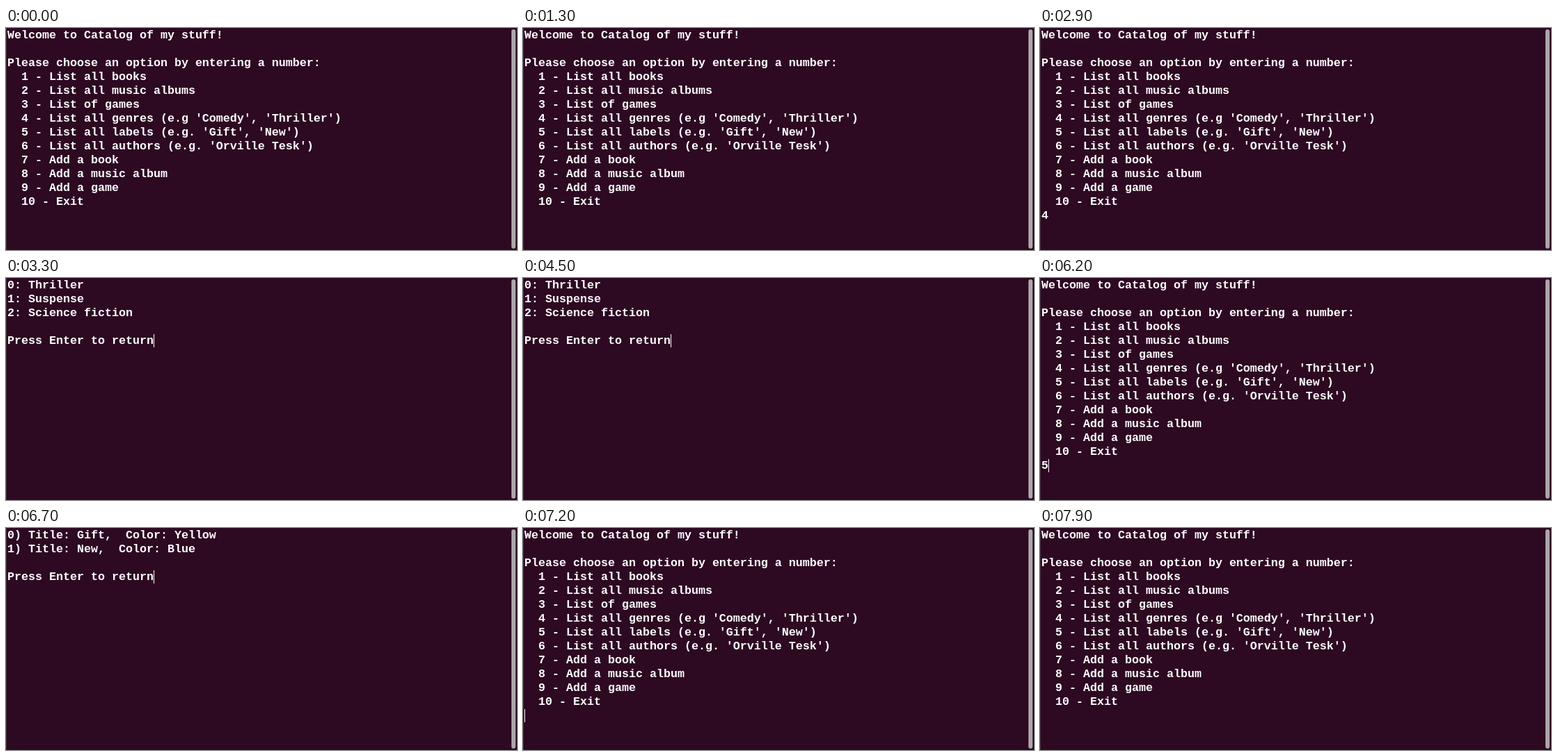
Recreate the animation shown at these times as an HTML page. Size 734x320 px, loop 8000 ms.

```html
<!DOCTYPE html>
<html lang="en">
<head>
<meta charset="utf-8">
<title>Catalog terminal</title>
<style>
  html, body { margin: 0; width: 100%; height: 100%; overflow: hidden; background: #2d0922; }
  svg { display: block; width: 734px; height: 320px; }
  text { font: bold 16.664px "Liberation Mono", monospace; fill: #fff; white-space: pre; }
</style>
</head>
<body>
<svg viewBox="0 0 734 320">
  <rect width="734" height="320" fill="#2d0922"/>
  <rect width="1" height="320" fill="#42323e"/>
  <rect x="726" y="2" width="6" height="316" rx="3" fill="#aba6a9"/>
  <g id="screen"></g>
  <rect id="cursor" width="1" height="19" fill="#fff"/>
</svg>
<script>
const LOOP = 8000, CELL = 10, ROW = 20, LEFT = 2, BASELINE = 15;
const NS = "http://www.w3.org/2000/svg";
const screenGroup = document.getElementById("screen");
const cursor = document.getElementById("cursor");

const menu = [
  "Welcome to Catalog of my stuff!",
  "",
  "Please choose an option by entering a number:",
  "  1 - List all books",
  "  2 - List all music albums",
  "  3 - List of games",
  "  4 - List all genres (e.g 'Comedy', 'Thriller')",
  "  5 - List all labels (e.g. 'Gift', 'New')",
  "  6 - List all authors (e.g. 'Orville Tesk')",
  "  7 - Add a book",
  "  8 - Add a music album",
  "  9 - Add a game",
  "  10 - Exit"
];
const prompt = "Press Enter to return";
const typed = key => [...menu, key];
const genres = ["0: Thriller", "1: Suspense", "2: Science fiction", "", prompt];
const labels = ["0) Title: Gift,  Color: Yellow", "1) Title: New,  Color: Blue", "", prompt];

// Start time and the lines shown from then on; the cursor follows the last line.
const screens = [
  [0, typed("")], [2300, typed("4")], [3300, genres],
  [4900, typed("")], [6200, typed("5")], [6700, labels], [7200, typed("")]
];
// Spans in which the cursor is visible.
const cursorOn = [
  [700, 1300], [1800, 2900], [3300, 3800], [4500, 5500], [6100, 7900]
];

let shown = null;

function showLines(lines) {
  if (lines === shown) return;
  shown = lines;
  screenGroup.replaceChildren(...lines.map((line, row) => {
    const text = document.createElementNS(NS, "text");
    text.setAttribute("x", LEFT);
    text.setAttribute("y", BASELINE + row * ROW);
    text.textContent = line;
    return text;
  }));
  const last = lines.length - 1;
  cursor.setAttribute("x", LEFT + lines[last].length * CELL);
  cursor.setAttribute("y", 1 + last * ROW);
}

function render(time) {
  showLines(screens.findLast(([start]) => time >= start)[1]);
  const visible = cursorOn.some(([from, to]) => time >= from && time < to);
  cursor.setAttribute("visibility", visible ? "visible" : "hidden");
}

const begin = performance.now();
function tick() {
  render((performance.now() - begin) % LOOP);
  requestAnimationFrame(tick);
}
tick();
</script>
</body>
</html>
```
